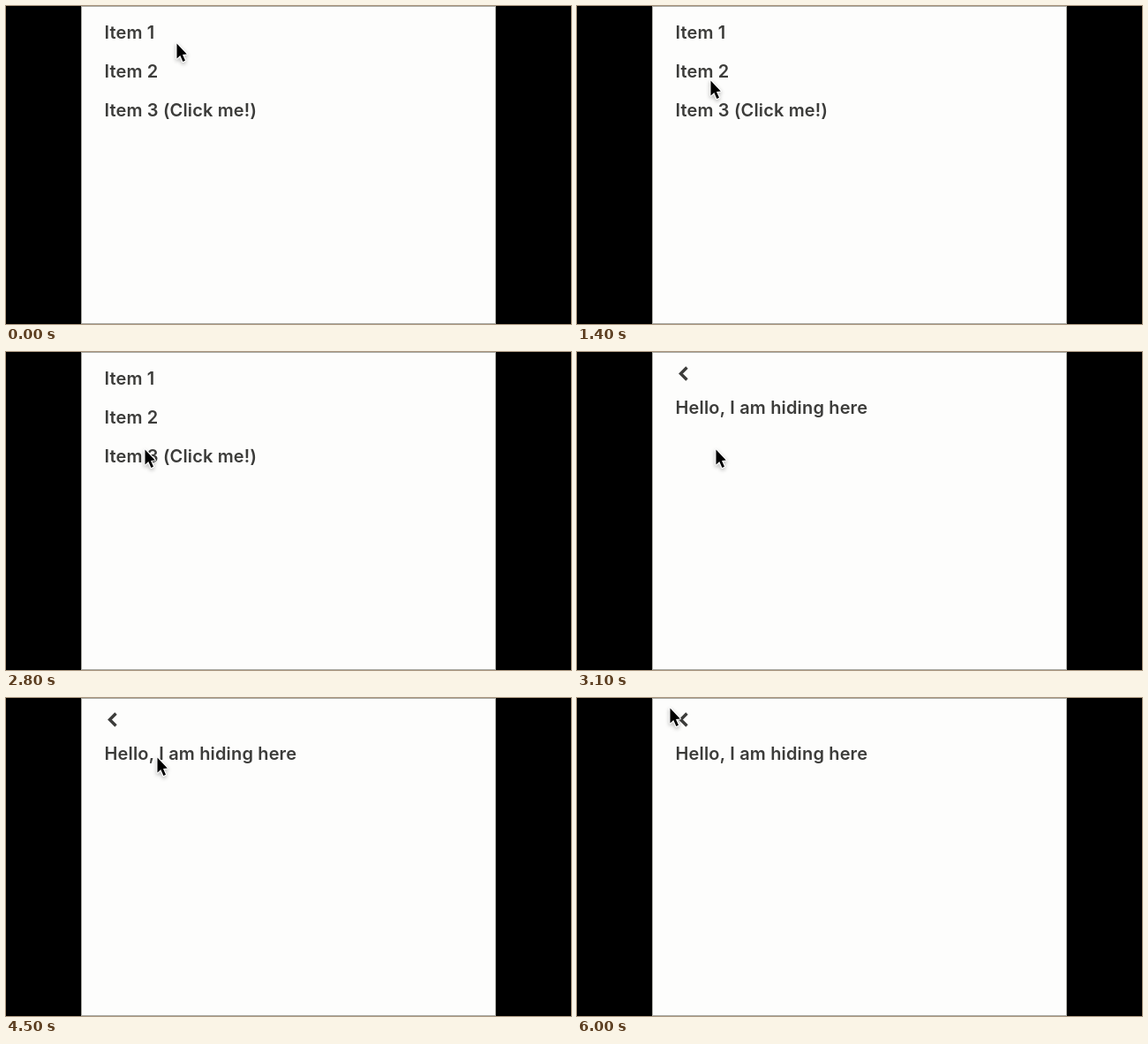
An HTML page with a canvas that plays this animation: 640x360 px, repeating every 6.1 s.

```html
<!DOCTYPE html>
<html lang="en">
<head>
<meta charset="utf-8">
<title>Hidden page</title>
<style>
  html, body { margin: 0; width: 100%; height: 100%; overflow: hidden; background: #000; }
  canvas { display: block; }
</style>
</head>
<body>
<canvas id="stage" width="640" height="360"></canvas>
<script>
const ctx = document.getElementById('stage').getContext('2d');
const LOOP = 6100;
const STEP = 100;
const CLICK = 3000;
const INK = '#3c3c3a';
const LEFT = 111.5;

// The pointer's main stops; wave() adds the gestures between them
const STOPS = [
  { at: 0, x: 193, y: 41 },
  { at: 800, x: 160, y: 40 },
  { at: 2000, x: 141, y: 49 },
  { at: 2800, x: 157, y: 109 },
  { at: 3600, x: 157, y: 109 },
  { at: 4500, x: 171, y: 66 },
  { at: 6000, x: 105, y: 10 }
];

const clamp = v => Math.min(1, Math.max(0, v));
const smooth = v => v * v * (3 - 2 * v);
const progress = (time, from, to) => clamp((time - from) / (to - from));

function wave(time, from, to, halfTurns, size) {
  return size * Math.sin(Math.PI * halfTurns * progress(time, from, to));
}

function pointerAt(time) {
  let { x, y } = STOPS[0];
  for (let i = 1; i < STOPS.length; i++) {
    const a = STOPS[i - 1], b = STOPS[i];
    const p = smooth(progress(time, a.at, b.at));
    x += (b.x - a.x) * p;
    y += (b.y - a.y) * p;
  }
  // Up and down over the list, later along the sentence and back
  y -= wave(time, 0, 2000, 5, 38);
  x += wave(time, 4500, 6000, 1, 150);
  return [x, y];
}

function trace(points) {
  ctx.beginPath();
  points.forEach(([x, y]) => ctx.lineTo(x, y));
}

function line(text, y) {
  ctx.fillStyle = INK;
  ctx.fillText(text, LEFT, y);
}

function drawPanel() {
  ctx.fillStyle = '#000';
  ctx.fillRect(0, 0, 640, 360);
  ctx.fillStyle = '#fdfdfc';
  ctx.fillRect(85, 0, 470, 360);
  ctx.strokeStyle = '#aaaaa4';
  ctx.lineWidth = 1;
  ctx.strokeRect(85.5, 0.5, 469, 359);
}

function drawList() {
  ['Item 1', 'Item 2', 'Item 3 (Click me!)'].forEach((text, i) => line(text, 37 + 44 * i));
}

function drawDetail() {
  trace([[124.5, 17.5], [117.5, 24.5], [124.5, 31.5]]);
  ctx.strokeStyle = INK;
  ctx.lineWidth = 3.4;
  ctx.stroke();
  line('Hello, I am hiding here', 70);
}

function drawPointer(x, y) {
  ctx.save();
  ctx.translate(Math.round(x), Math.round(y));
  trace([[0.5, 1.5], [0.5, 18.5], [4.3, 15], [7.4, 22], [10, 20.8], [7, 14], [11.8, 13.5]]);
  ctx.closePath();
  ctx.lineJoin = 'round';
  ctx.lineWidth = 2.2;
  ctx.strokeStyle = '#fff';
  ctx.shadowColor = 'rgba(0, 0, 0, 0.3)';
  ctx.shadowBlur = 4;
  ctx.shadowOffsetY = 2;
  ctx.stroke();
  ctx.shadowColor = 'transparent';
  ctx.fillStyle = '#000';
  ctx.fill();
  ctx.restore();
}

function draw(now) {
  const time = Math.floor((now % LOOP) / STEP) * STEP;
  ctx.font = '600 20px Inter, sans-serif';
  ctx.letterSpacing = '0.15px';
  drawPanel();
  if (time < CLICK) drawList();
  else drawDetail();
  drawPointer(...pointerAt(time));
}

let start;
function tick(now) {
  start ??= now;
  draw(Math.max(0, now - start));
  requestAnimationFrame(tick);
}
draw(0);
requestAnimationFrame(tick);
</script>
</body>
</html>
```
